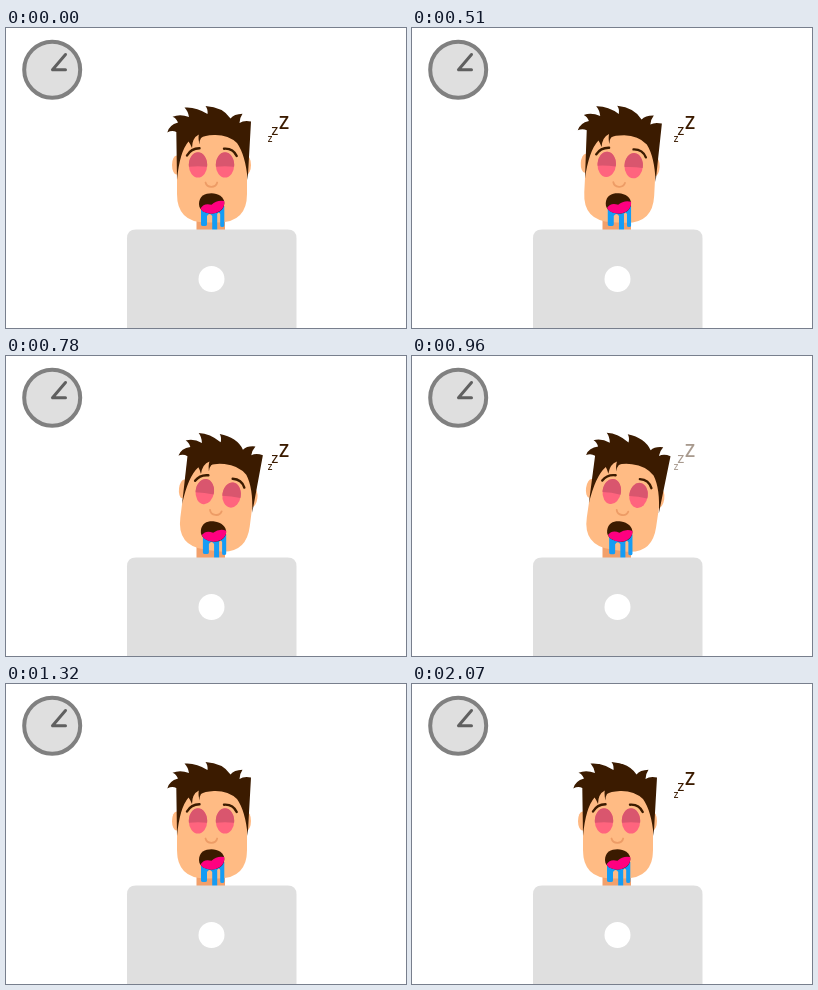
These frames come from a looping animation (400x300 px, 3 s). An HTML page:

```html
<!DOCTYPE html>
<html lang="en">
<head>
<meta charset="utf-8">
<title>Asleep at the desk</title>
<style>
  html, body { margin: 0; width: 100%; height: 100%; overflow: hidden; background: #fff; }
  svg { display: block; width: 400px; height: 300px; }
  text { font-family: "Open Sans", "Liberation Sans", sans-serif; font-weight: 600; fill: #3b1b00; }
  .line { fill: none; stroke-linecap: round; stroke-linejoin: round; }
</style>
</head>
<body>
<svg viewBox="0 0 400 300">
  <defs>
    <g id="eye">
      <ellipse rx="9.2" ry="12.6" fill="#ff647e"/>
      <path d="M-9.1 1.8A9.2 12.6 0 1 1 9.1 1.8Q0 .8 -9.1 1.8Z" fill="#d9566e"/>
    </g>
  </defs>

  <!-- clock -->
  <circle cx="46.2" cy="41.7" r="28" fill="#dfdfdf" stroke="#808080" stroke-width="4"/>
  <path class="line" d="M59.5 26.5L46.5 41.8H59.5" stroke="#606060" stroke-width="3"/>

  <rect x="190.5" y="186" width="28.5" height="18" fill="#f2a06b"/>

  <g id="head">
    <ellipse cx="170.5" cy="137" rx="4.5" ry="9.5" fill="#ffb982"/>
    <ellipse cx="240.5" cy="137" rx="4.5" ry="9.5" fill="#ffb982"/>
    <path d="M171 106H241V166Q241 194.5 212 194.5H200Q171 194.5 171 166Z" fill="#ffbb84"/>
    <!-- hair: outer spikes left to right, then fringe back to the left -->
    <path fill="#3b1b00" d="M171 152L170.3 104Q166 102 161.3 104.5Q163 97 172 94.5
      Q170 90 166.5 88.8Q174 85.5 183 89Q182 83 178.5 79.5Q190 78.5 201.5 86Q202 81 199.5 78
      Q217 79 224.5 90.5Q228 86 236.5 85.7Q233.5 90 233.5 95Q238 92 245 93.5L241.7 152
      Q239.5 127 231 115Q222 106.5 208 107Q198 107.5 195 110Q193.5 112 193.5 116.5
      Q192 110 192.8 106.5Q186 110 186 120Q184.5 116 182.5 113.5Q173.5 124 171 152Z"/>
    <g class="line" stroke="#3b1b00" stroke-width="2.4">
      <path d="M181 127.5Q185 120.5 193.5 120.3"/>
      <path d="M218 120.7Q227 120 230.7 128"/>
    </g>
    <use href="#eye" x="192" y="137"/>
    <use href="#eye" x="219" y="137"/>
    <path class="line" d="M199.5 154.5A6 5.5 0 0 0 211.2 154.5" stroke="#ed9c66" stroke-width="1.8"/>

    <!-- mouth; the drool hangs straight down -->
    <path id="drool" d="M195 178H218.3V197.5Q218.3 199 216.2 199T214.2 197.5V186Q212.7 183 211.2 186V202H206.2V188
      Q203.6 184 201 188V196.5Q201 198 198 198T195 196.5Z" fill="#159cf4"/>
    <path d="M193 176C193 168 199 165.3 205.5 165.3S218.3 169 218.3 175C218.3 182 212 185.5 206 185.5S193 183 193 176Z" fill="#3b1b00"/>
    <path d="M194.5 180.5Q198 174.5 205.5 176.8Q211 171.5 218.3 173Q219 179 214 183Q206 188 197 183.5Z" fill="#ff0080"/>
  </g>

  <g id="snore">
    <text x="261.8" y="114" font-size="8">Z</text>
    <text x="265.6" y="107" font-size="11.5">Z</text>
    <text x="273" y="100.6" font-size="17.5">Z</text>
  </g>

  <!-- laptop -->
  <path d="M121 300V210.5Q121 201.5 130 201.5H281.5Q290.5 201.5 290.5 210.5V300Z" fill="#dfdfdf"/>
  <circle cx="205.5" cy="251" r="13" fill="#fff"/>
</svg>
<script>
  const LOOP = 3000;
  const head = document.getElementById("head");
  const drool = document.getElementById("drool");
  const letters = [...document.querySelectorAll("#snore text")];
  const ramp = (t, from, to) => Math.min(1, Math.max(0, (t - from) / (to - from)));

  // Slow nod, faster droop, then a quick jerk back upright.
  function tilt(t) {
    if (t < 540) return 3.1 * t / 540;
    if (t < 1080) return 3.1 + 5.3 * (1 - (1 - ramp(t, 540, 1080)) ** 2.6);
    return 4.2 * (1 + Math.cos(Math.PI * ramp(t, 1080, 1320)));
  }

  function draw(now) {
    const t = now % LOOP;
    const angle = tilt(t);
    head.setAttribute("transform", `rotate(${angle} 206 190)`);
    drool.setAttribute("transform", `rotate(${-angle} 206 175)`);
    letters.forEach((letter, i) => {
      const start = 1770 + 90 * i;
      letter.setAttribute("opacity", t < 1400 ? 1 - ramp(t, 810, 1080) : ramp(t, start, start + 120));
    });
    requestAnimationFrame(draw);
  }
  draw(performance.now());
</script>
</body>
</html>
```
